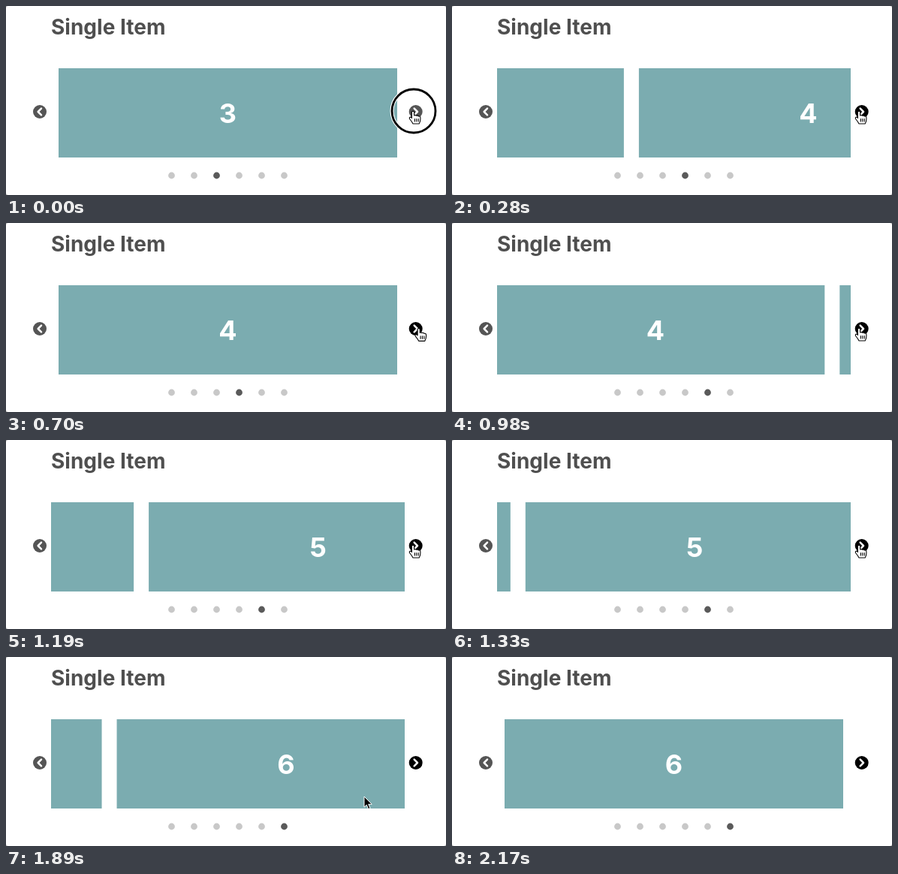
These frames come from a looping animation (586x252 px, 2.52 s). An HTML page:

```html
<!DOCTYPE html>
<html lang="en">
<head>
<meta charset="utf-8">
<title>Single item carousel</title>
<style>
  html, body { margin: 0; width: 100%; height: 100%; overflow: hidden; background: #aaa; }
  svg { display: block; }
  text { font-family: Inter, Roboto, sans-serif; font-weight: 700; }
  .digit { font-size: 36px; fill: #fff; text-anchor: middle; }
  .chevron { fill: none; stroke: #fff; stroke-width: 2.5; stroke-linecap: round; stroke-linejoin: round; }
</style>
</head>
<body>
<svg width="586" height="252" viewBox="0 0 586 252">
  <clipPath id="viewport"><rect x="60" y="80" width="471" height="125"/></clipPath>
  <rect width="586" height="252" rx="3" fill="#fff"/>
  <text x="60" y="38" font-size="28" fill="#4f4f4f">Single Item</text>
  <g clip-path="url(#viewport)"><g id="track"></g></g>
  <g id="dots"></g>
  <circle cx="45" cy="141" r="9" fill="#555"/>
  <path class="chevron" d="M47 136.7L42.7 141L47 145.3"/>
  <circle id="next" cx="545.7" cy="141" r="9"/>
  <path class="chevron" d="M543.7 136.7L548 141L543.7 145.3"/>
  <g id="ring" fill="none">
    <circle cx="543" cy="140" r="29" stroke="#fff" stroke-width="5"/>
    <circle cx="543" cy="140" r="29" stroke="#000" stroke-width="2.8"/>
  </g>
  <g id="cursor">
    <g id="hand" stroke="#000" stroke-width="1.1" stroke-linejoin="round" stroke-linecap="round">
      <path fill="#fff" d="M-1.6 9.5V1.2Q0-.8 1.6 1.2V6Q3.2 4.8 4.4 6.3Q6 5.3 7.2 7Q9.6 6.3 9.9 8.8V11Q9.9 14 8.2 17H0Q-1.5 14-4.5 10.5Q-5.2 8-2.9 8Z"/>
      <path fill="none" d="M2.4 10.5v3.5M4.8 10.5v3.5M7.2 10.5v3.5"/>
    </g>
    <path id="arrow" fill="#000" stroke="#fff" stroke-width="1" d="M0 0V14.2L3.3 11.2L5.6 16.6L8 15.6L5.7 10.3H10.2Z"/>
  </g>
</svg>
<script>
const LOOP = 2520, STEP = 70, PITCH = 471, FIRST = 3;
const moves = [
  { click: 70, start: 86, length: 540 },
  { click: 930, start: 942, length: 554 },
  { click: 1600, start: 1610, length: 523 },
];
const presses = [[0, 70], [910, 980], [1540, 1610]];
const pointerPath = [
  [0, 542, 140], [280, 542, 140], [490, 565, 141], [560, 565, 141],
  [770, 542, 140], [1680, 542, 140], [1890, 477, 186], [1960, 464, 194],
];
const POINTER_GONE = 2030;

const $ = id => document.getElementById(id);
function add(parent, tag, attrs, text = '') {
  const node = document.createElementNS('http://www.w3.org/2000/svg', tag);
  for (const key in attrs) node.setAttribute(key, attrs[key]);
  node.textContent = text;
  return parent.appendChild(node);
}
const show = (id, on) => $(id).setAttribute('visibility', on ? 'inherit' : 'hidden');
const clamp = v => Math.min(1, Math.max(0, v));

// The CSS "ease" curve, cubic-bezier(.25, .1, .25, 1)
function ease(x) {
  let low = 0, high = 1;
  for (let i = 0; i < 24; i++) {
    const s = (low + high) / 2;
    if (0.75 * s * (1 - s) + s ** 3 < x) low = s; else high = s;
  }
  const s = high, r = 1 - s;
  return 0.3 * s * r * r + 3 * s * s * r + s ** 3;
}

function pointerAt(t) {
  const i = pointerPath.findIndex(p => p[0] > t);
  if (i < 0) return pointerPath.at(-1).slice(1);
  const [t0, x0, y0] = pointerPath[i - 1], [t1, x1, y1] = pointerPath[i];
  const k = (t - t0) / (t1 - t0);
  return [x0 + (x1 - x0) * k, y0 + (y1 - y0) * k];
}

for (let i = 0; i <= moves.length; i++) {
  const x = 70 + i * PITCH;
  add($('track'), 'rect', { x, y: 83, width: 451, height: 119, fill: '#7bacb0' });
  add($('track'), 'text', { x: x + 225.5, y: 155.5, class: 'digit' }, FIRST + i);
}
const dots = Array.from({ length: 6 }, (_, i) =>
  add($('dots'), 'circle', { cx: 220.5 + 30 * i, cy: 226, r: 4.4 }));

function draw(time) {
  const t = Math.floor(time % LOOP / STEP) * STEP;
  const shift = moves.reduce((sum, m) => sum + ease(clamp((t - m.start) / m.length)), 0);
  $('track').setAttribute('transform', `translate(${-shift * PITCH})`);

  const active = FIRST - 1 + moves.filter(m => t >= m.click).length;
  dots.forEach((dot, i) => dot.setAttribute('fill', i === active ? '#5a5a5a' : '#c8c8c8'));
  $('next').setAttribute('fill', t < moves[0].click ? '#555' : '#000');
  show('ring', presses.some(([from, to]) => t >= from && t < to));

  const [x, y] = pointerAt(t);
  const overButton = Math.abs(x - 546) < 10 && Math.abs(y - 141) < 10;
  $('cursor').setAttribute('transform', `translate(${x} ${y})`);
  show('cursor', t < POINTER_GONE);
  show('hand', overButton);
  show('arrow', !overButton);
}

const begin = performance.now();
function tick() {
  draw(performance.now() - begin);
  requestAnimationFrame(tick);
}
tick();
</script>
</body>
</html>
```
